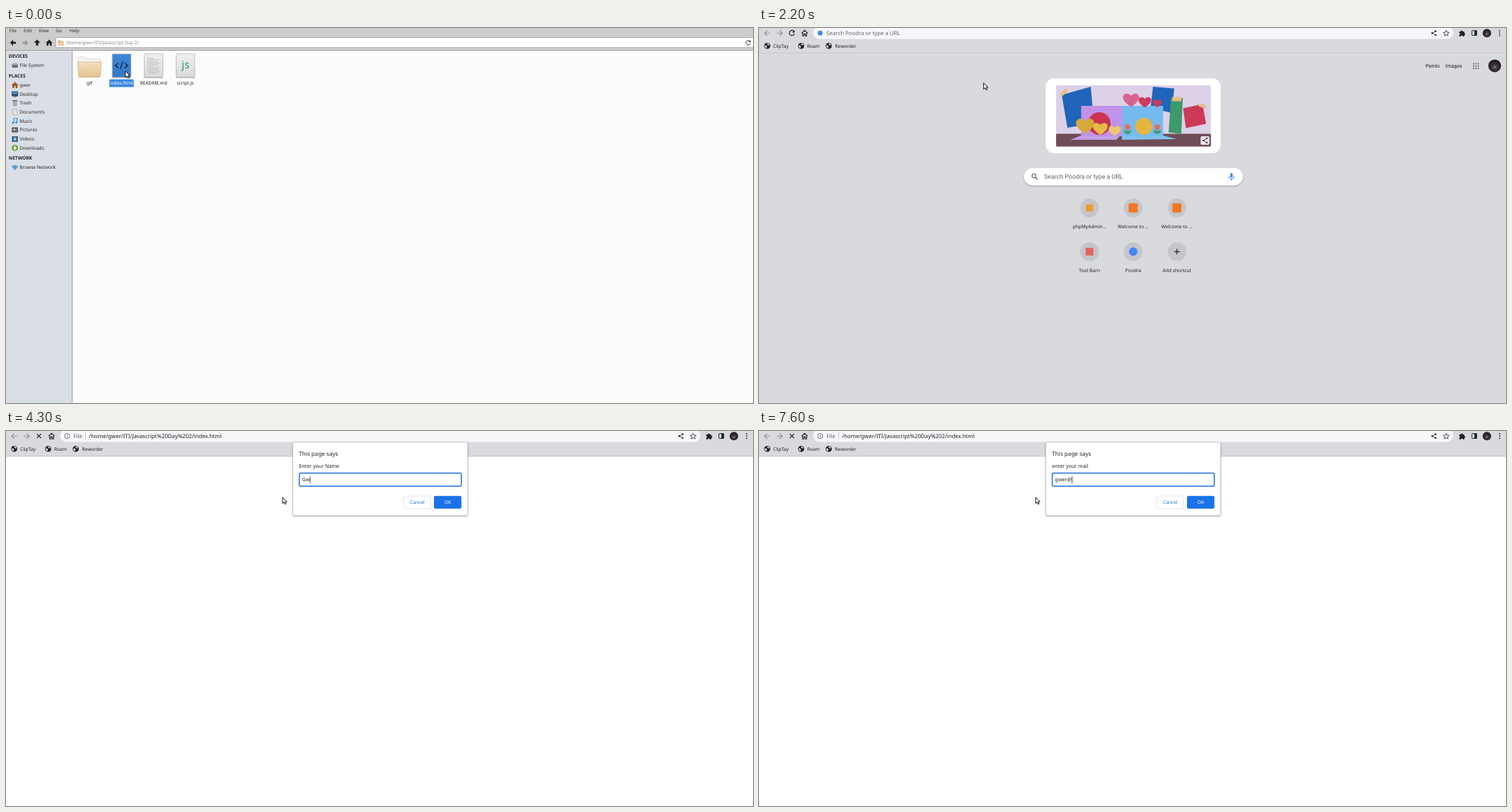
Recreate the animation shown at these times as an HTML page. Size 1056 by 530 pixels, loop 8000 ms.

```html
<!DOCTYPE html>
<html lang="en">
<head>
<meta charset="utf-8">
<title>Prompt demo</title>
<style>
html, body { margin: 0; width: 100%; height: 100%; overflow: hidden; background: #fff; }
svg { display: block; width: 100%; height: 100%; }
text { font-family: "Noto Sans", sans-serif; text-rendering: geometricPrecision; white-space: pre; }
.rb { font-family: Roboto, sans-serif; }
</style>
</head>
<body>
<svg id="stage" viewBox="0 0 1056 530" xmlns="http://www.w3.org/2000/svg"></svg>
<script>
const LOOP = 8000;
const USER = 'gwer', BRAND = 'Poodra';
const INK = '#202124', GREY = '#5f6368', BLUE = '#1a73e8', CHROME = '#d9dade';

// Markup helpers
const rect = (x, y, w, h, fill, r = 0, more = '') =>
  `<rect x="${x}" y="${y}" width="${w}" height="${h}" rx="${r}" fill="${fill}" ${more}/>`;
const circle = (x, y, r, fill, more = '') => `<circle cx="${x}" cy="${y}" r="${r}" fill="${fill}" ${more}/>`;
const path = (d, fill, more = '') => `<path d="${d}" fill="${fill}" ${more}/>`;
const line = (d, color, w = 1, more = '') => path(d, 'none', `stroke="${color}" stroke-width="${w}" ${more}`);
const text = (x, y, s, size = 6.6, fill = INK, more = '') =>
  `<text x="${x}" y="${y}" font-size="${size}" fill="${fill}" ${more}>${s}</text>`;
const place = (x, y, s = 1) => `matrix(${s} 0 0 ${s} ${x} ${y})`;
const move = (x, y, body, s = 1) => `<g transform="${place(x, y, s)}">${body}</g>`;
const group = (id, body) => `<g id="${id}">${body}</g>`;
const MID = 'text-anchor="middle"', BOLD = 'font-weight="bold"';

const defs = `<defs>
  <linearGradient id="tan" x2="0" y2="1"><stop stop-color="#f4dfbd"/><stop offset="1" stop-color="#e3c28f"/></linearGradient>
  <linearGradient id="paper" x2="0" y2="1"><stop stop-color="#f0f0f0"/><stop offset="1" stop-color="#d9d9d9"/></linearGradient>
  <linearGradient id="sel" x2="0" y2="1"><stop stop-color="#3c87da"/><stop offset="1" stop-color="#3478c6"/></linearGradient>
  <radialGradient id="photo" cy=".6"><stop stop-color="#8d8290"/><stop offset=".35" stop-color="#403641"/><stop offset="1" stop-color="#211a22"/></radialGradient>
  <filter id="shade" x="-10%" y="-20%" width="120%" height="150%"><feDropShadow dx="0" dy="1" stdDeviation="1.2" flood-opacity=".35"/></filter>
</defs>`;

// File manager
const house = (c, door) => path('M0 -4.5L4.8 0H3.5V4H-3.5V0H-4.8Z', c) + rect(-1, 1, 2, 3, door);
const places = [
  [53, 'File System', rect(-4, -2, 8, 5, '#666', 1) + rect(-3, -3.5, 6, 3, '#aaa', .5)],
  [81, USER, house('#8a5a30', '#f0dcc0') + line('M-4.5 0L0 -4L4.5 0', '#c0642c', 1.2)],
  [93.5, 'Desktop', rect(-4.5, -4, 9, 7, '#34485c', .5) + rect(-3.5, -3, 7, 3, '#4c90cc') + rect(-2, 3, 4, 1, '#555')],
  [106, 'Trash', path('M-3 -3H3L2.5 4.2H-2.5Z', '#9a9a9a') + rect(-3.6, -4, 7.2, 1.2, '#666') + line('M-1 -2V3M1 -2V3', '#ddd', .6)],
  [119, 'Documents', rect(-3, -4, 6, 8, '#f4f4f4', .5, 'stroke="#888" stroke-width=".6"') + line('M-2 -2H2M-2 0H2M-2 2H1', '#aaa', .5)],
  [131.5, 'Music', line('M-1.5 2.5V-3.5L3 -4V1.5', '#3a8fd0', 1.1) + circle(-2.6, 2.6, 1.5, '#3a8fd0') + circle(1.9, 1.8, 1.5, '#3a8fd0')],
  [144, 'Pictures', rect(-4.2, -3.4, 8.4, 6.8, '#444', .5) + rect(-3, -2.2, 6, 4.4, '#8b8074') + circle(-1, -.5, 1, '#eee')],
  [157, 'Videos', rect(-4, -4, 8, 8, '#3b4654', .5) + rect(-2.4, -3.3, 4.8, 6.6, '#4a94d8') + path('M-1 -1.6L1.8 0L-1 1.6Z', '#fff')],
  [169.5, 'Downloads', circle(0, 0, 4.4, '#6aa62c') + path('M-1 -2.8H1V0H2.6L0 2.9L-2.6 0H-1Z', '#fff')],
  [197, 'Browse Network', path('M-4.6 -1.2Q0 -5 4.6 -1.2L0 4Z', '#3a87c8') + line('M-3.4 .2Q0 -2.4 3.4 .2M-2 1.8Q0 .4 2 1.8', '#dadee6', .6)]
];
const sheet = (x, fill) => rect(x, 36.8, 26.4, 33, fill, .8, 'stroke="#a9a9a9" stroke-width=".7"') + line(`M${x} 70.3h26.4`, '#999', .6);
const navArrow = (x, c, s) => path(`M${x - 4 * s} 20.8l${4.2 * s} -4.4v3h${4 * s}v2.8h${-4 * s}v3z`, c);

const files = group('files',
  rect(0, 0, 1056, 530, '#fcfcfc') + rect(0, 0, 1056, 31.5, '#cccccc') +
  [['File', 4.5], ['Edit', 25], ['View', 46], ['Go', 70.3], ['Help', 89.5]].map(([s, x]) => text(x, 6, s, 6.6, '#333')).join('') +
  navArrow(9.8, '#222', 1) + navArrow(27.3, '#999', -1) +
  path('M44 16.2l4.5 4.6h-2.9v4h-3.2v-4h-2.9z', '#222') + move(61, 21, house('#222', '#ccc')) +
  rect(70.5, 13.5, 1000, 14.2, '#fff', 1.5, 'stroke="#9c9c9c" stroke-width=".8"') +
  path('M73 17.5h3.5l1 1h4v6.5h-8.5z', '#d5b07c') + rect(73, 19.5, 8.5, 5.2, '#ecd0a2') +
  `<text id="path" x="85" y="23.2" font-size="6.58">/home/${USER}/ITI/Javascript Day 2/</text>` +
  line('M1051.6 18.6a3.2 3.2 0 1 0 .7 3', '#333', 1) + path('M1052.6 16.8v3.2h-3.2z', '#333') +
  rect(0, 31, 1056, 1, '#a0a0a0') + rect(0, 32, 93.3, 498, '#dadee6') + rect(93.2, 32, .9, 498, '#8d9096') +
  [['DEVICES', 42], ['PLACES', 69.6], ['NETWORK', 186]].map(([s, y]) => text(3.8, y, s, 6.6, '#222', BOLD)).join('') +
  places.map(([y, s, icon]) => move(12.6, y, icon) + text(19.3, y + 2.4, s, 6.6, '#2a2a2a')).join('') +
  path('M102.5 50V43q0-2 2-2h8l2 2.5h17q2 0 2 2V50z', '#f4f4f2', 'stroke="#c8c8c4" stroke-width=".6"') +
  path('M101.5 48h33l-1 19.5q0 2-2 2h-27q-2 0-2-2z', 'url(#tan)', 'stroke="#c4a06c" stroke-width=".6"') +
  sheet(150.2, 'url(#sel)') + line('M159 49.5l-4.6 3.4 4.6 3.4M167.6 49.5l4.6 3.4-4.6 3.4M164.8 47.5l-3 10.5', '#14304e', 1.5) +
  sheet(195.4, 'url(#paper)') +
  Array.from({ length: 10 }, (_, i) => line(`M199.5 ${42.5 + i * 2.3}h${[9, 17, 15, 18, 16][i % 5]}`, '#b4b4b4', .8)).join('') +
  sheet(240.5, 'url(#paper)') + text(253.8, 57, 'js', 15, '#2c9484', MID) +
  rect(146, 72.4, 34.6, 11.2, '#3a88e0', 1.5) +
  [['gif', 118], ['index.html', 163.3, '#fff'], ['README.md', 208.6], ['script.js', 253.4]]
    .map(([s, x, c = '#222']) => text(x, 80.3, s, 6.6, c, MID)).join(''));

// Browser frame
const globe = x => circle(x, 25.2, 4.3, INK) +
  path(`M${x - 3.6} 24.4q3-.2 3.2 1.4t-1 3q-2.2-1.4-2.2-4.4zM${x} 21.6q2.6 .2 3.2 2.6-2 .6-3-.4z`, CHROME);
const arrow = (x, s) => line(`M${x + 4 * s} 7.2H${x - 4 * s}m${3.8 * s} -3.8l${-3.8 * s} 3.8l${3.8 * s} 3.8`, '#8f9297', 1.1);
const reload = line('M49.3 4.6a3.6 3.6 0 1 0 .8 3.4', INK, 1.2) + path('M50.4 2.9v3.6h-3.6z', INK);

const frame = group('frame',
  rect(0, 0, 1056, 36, CHROME) + rect(0, 35.5, 1056, .9, '#b4b6bb') +
  arrow(11.8, 1) + arrow(29, -1) +
  line('M60.3 7.2L64.5 3.3l4.2 3.9M61.7 6.6v4.7h1.8V8.4h2v2.9h1.8V6.6', INK, 1.1) +
  rect(76.5, -2.5, 905, 18, '#f6f7f9', 9) +
  [['ClipTay', 20, 11.6], ['Roam', 68, 59.6], ['Reworder', 107.5, 98.6]].map(([s, x, g]) => globe(g) + text(x, 27.5, s)).join('') +
  line('M956.5 4.7L951.8 7.2l4.7 2.5', INK, .8) + [[956.5, 4.5], [951.7, 7.2], [956.5, 9.9]].map(([x, y]) => circle(x, y, 1.2, INK)).join('') +
  path('M971.5 3.2l1.2 2.8 3 .3-2.3 2 .7 2.9-2.6-1.6-2.6 1.6 .7-2.9-2.3-2 3-.3z', 'none', `stroke="${INK}" stroke-width=".8"`) +
  path('M989.8 5h2.3a1.4 1.4 0 1 1 2.8 0h2.2v2.3a1.3 1.3 0 1 1 0 2.6v1.8h-2.3a1.2 1.2 0 1 0-2.4 0h-2.6V9.4a1.2 1.2 0 1 0 0-2.4z', INK) +
  rect(1007.8, 3.7, 6.8, 6.8, 'none', .6, `stroke="${INK}"`) + rect(1011.4, 3.5, 3.4, 7.2, INK) +
  circle(1029, 7.2, 6, 'url(#photo)') + [4, 7.2, 10.4].map(y => circle(1047, y, .9, INK)).join(''));

// New tab page
const heart = (x, y, s, c) => move(x, y, path('M0 .9C-2 -.3 -.6 -1.3 0 -.5C.6 -1.3 2 -.3 0 .9Z', c), s);
const flower = x => path(`M${x} 150v-8m0 7q-5 0-4.5-4q4 0 4.5 4q.5-4 4.5-4q.5 4-4.5 4`, '#3f9a68', 'stroke="#3f9a68"') + circle(x, 140, 4, '#e0705c');
const scene = rect(405.3, 71, 247.3, 106, '#fff', 12) +
  rect(420, 81, 218.8, 86.5, '#dcd1e8', 2) + rect(420, 149.5, 218.8, 18, '#6f4d57', 1) +
  path('M428 94.5L469 83l4.5 51.5-37.5 6.5z', '#2065ba') + path('M557 83l30 2.5-3.5 34.5-30-7z', '#2065ba') +
  path('M582.5 99h16.5l-2 50.5-18-2z', '#3c9a6c') + path('M599.5 113.5L627 107.5l5 28-28.5 6z', '#cc3a58') +
  path('M425 93l9-8 3 4-9 8z', '#e5bd86') + rect(584, 97.5, 13, 6, '#e5bd86') + path('M620 107l10 1 3 6-11-3z', '#e5bd86') +
  path('M440 158l20-8h53l-8 8z', '#c4a0e4') + path('M513 150h50l28 7-78 1z', '#80c0ee') +
  rect(455.5, 110, 58, 43, '#c192e8') + rect(513.3, 110, 58, 43, '#74baee') +
  circle(481, 135, 16, '#c93450') + circle(544, 139, 12, '#e3b63e') + flower(521) + flower(563) +
  heart(526, 101.5, 11, '#d8638e') + heart(545.5, 104.5, 8.5, '#cc3a5c') + heart(563, 106.5, 6.2, '#cc3a5c') +
  heart(461, 138, 12.5, '#d8a93a') + heart(482.5, 142, 10, '#e5bd45') + heart(503, 145, 8.3, '#ecc970') +
  rect(624.3, 153, 12.4, 12, '#ece6f0', 2) + line('M633 156l-5 3 5 3', '#444', .8) +
  [[633, 156], [628, 159], [633, 162]].map(([x, y]) => circle(x, y, 1.3, '#444')).join('');
const tiles = [
  ['phpMyAdmin…', rect(-5, -5, 10, 10, '#f29a2e')], ['Welcome to …', rect(-6.5, -6.5, 13, 13, '#f37623', 2)],
  ['Welcome to …', rect(-6.5, -6.5, 13, 13, '#f37623', 2)], ['Tool Barn', rect(-5.5, -5.5, 11, 11, '#e2665c')],
  [BRAND, circle(0, 0, 6, '#4285f4')], ['Add shortcut', line('M-4 0H4M0 -4V4', INK, 1.1)]
];
const newTab = group('newTab',
  rect(0, 36.4, 1056, 494, CHROME) + circle(86.5, 7.2, 3.4, '#4285f4') + reload +
  text(95.3, 10, `Search ${BRAND} or type a URL`, 7.8, GREY) +
  text(962.5, 56, 'Pemlo', 7.15, INK, 'class="rb" text-anchor="end"') + text(970.3, 56, 'Images', 7.15, INK, 'class="rb"') +
  [0, 1, 2, 3, 4, 5, 6, 7, 8].map(i => circle(1010.1 + i % 3 * 3.3, 50.5 + (i / 3 | 0) * 3.3, 1, GREY)).join('') +
  circle(1040, 53.4, 9, 'url(#photo)') + scene +
  rect(374.6, 198, 309.5, 24.4, '#fff', 12.2, 'filter="url(#shade)"') +
  circle(388.7, 209, 2.7, 'none', `stroke="${GREY}" stroke-width="1.1"`) + line('M390.6 211l3.4 3.4', GREY, 1.3) +
  text(403, 213.3, `Search ${BRAND} or type a URL`, 8.8, GREY, 'class="rb"') +
  rect(666.2, 205, 3.4, 6.6, '#4285f4', 1.7) + line('M664.2 209.6a3.7 3.7 0 0 0 7.4 0M667.9 213.3v2.4', '#4285f4', 1.1) +
  tiles.map(([s, icon], i) => {
    const x = 467.2 + i % 3 * 61.8, y = 254.3 + (i / 3 | 0) * 61.8;
    return circle(x, y, 13.2, '#c4c6ca') + move(x, y, icon) + text(x, y + 28.6, s, 6.7, INK, MID);
  }).join(''));

// Local page with its prompt
const page = group('page',
  rect(0, 36.4, 1056, 494, '#fff') + line('M43.6 4.2l6 6m0-6l-6 6', INK, 1.2) +
  circle(86.5, 7.2, 3.6, 'none', `stroke="${GREY}" stroke-width=".9"`) + line('M86.5 6.6v2.6M86.5 4.9v.9', GREY, .9) +
  text(95.4, 10, 'File', 7.8, GREY) + rect(112, 2, .8, 10, '#bcbfc4') +
  text(117.3, 10, `/home/${USER}/ITI/Javascript%20Day%202/index.html`, 7.8));
const dialog = group('dialog',
  rect(405.4, 15.8, 247.2, 103.4, '#fff', 2.2, 'stroke="#b5b7ba" stroke-width=".7" filter="url(#shade)"') +
  text(414.3, 34.9, 'This page says', 8.1) + `<text id="ask" x="414.3" y="51.8" font-size="7.1" fill="${INK}"/>` +
  rect(414.6, 59.5, 229, 18.6, '#fff', 1.6, 'stroke="#1f6fd6" stroke-width="1.5"') +
  `<text id="value" x="418.6" y="71.2" font-size="7.1" fill="${INK}"/>` + rect(0, 64.2, .8, 9.6, '#222', 0, 'id="caret"') +
  rect(562, 92, 38.5, 17.6, '#fff', 2, 'stroke="#dadce0" stroke-width=".7"') + text(581.4, 103.2, 'Cancel', 6.7, BLUE, MID) +
  rect(605, 91.8, 38.8, 18, BLUE, 2) + text(624.5, 103.2, 'OK', 6.7, '#fff', MID) +
  group('ghost', text(414.3, 50.8, 'Enter your Name', 7.1, INK, 'opacity=".08"') + text(418.6, 69.7, 'Gwer', 7.1, INK, 'opacity=".16"')));

const cursor = group('cursor',
  group('arrow', path('M.6 .6V9.4L2.7 7.6L4 10.6L5.5 9.9L4.2 7H6.8Z', '#fff', 'stroke="#111" stroke-width="1" stroke-linejoin="round"')) +
  group('hand', path('M.8 .8L4 3.2H6.5Q8.2 4 8 7.5Q7.6 10 4.8 10Q2 10 1.8 7L.9 5.4L2.6 4.8Z', '#fff', 'stroke="#222" stroke-width=".9" stroke-linejoin="round"') +
    line('M3.2 5.5h3.4M3.4 7.2h3', '#333', .6)));

document.getElementById('stage').innerHTML = defs + files + frame + newTab + page + dialog + cursor;
const el = Object.fromEntries([...document.querySelectorAll('svg [id]')].map(n => [n.id, n]));

// Timed states: each entry holds from its time until the next
const states = {
  view: [[0, 'files'], [2200, 'newTab'], [2300, 'page']],
  path: [[0, '#88847c'], [200, '#55544f'], [300, '#2e2e2e']],
  pointer: [[0, 168.3, 60.4], [700, 196, 70], [800, 246, 79], [900, 288.5, 76], [1100, 420, 76.5], [1300, 388, 76.5],
    [1400, 290, 77], [1500, 194, 77], [1600, 254, 77], [1700, 317, 77], [2700, 346, 83.5], [2900, 390.5, 93]],
  hand: [[0, false], [2000, true], [2200, false]],
  // opacity, rise, scale
  pop: [[0, 0, 0, 1], [2300, .02, 7.5, 1.018], [2400, .6, 5.5, 1.012], [2500, 1, 0, 1], [5300, .86, 4.6, 1.009], [5500, 1, 0, 1]],
  ask: [[0, 'Enter your Name'], [5300, 'enter your mail']],
  typed: [[0, ''], [4000, 'G'], [4300, 'Gw'], [4500, 'Gwe'], [4800, 'Gwer'], [5300, ''],
    [6600, 'g'], [6700, 'gw'], [6800, 'gwe'], [6900, 'gwer'], [7600, 'gwer@']],
  caret: [[0, true], [2700, false], [3200, true], [3700, false], [4000, true], [5800, false], [6200, true], [7500, false], [7600, true]]
};
const at = (name, t) => states[name].findLast(s => s[0] <= t).slice(1);
const show = (node, on) => node.setAttribute('display', on ? 'inline' : 'none');

function draw(t) {
  const [view] = at('view', t), [x, y] = at('pointer', t), [hand] = at('hand', t);
  const [alpha, rise, scale] = at('pop', t);
  show(el.files, view === 'files');
  show(el.frame, view !== 'files');
  show(el.newTab, view === 'newTab');
  show(el.page, view === 'page');
  el.path.setAttribute('fill', at('path', t)[0]);

  show(el.dialog, alpha > 0);
  el.dialog.setAttribute('opacity', alpha);
  el.dialog.setAttribute('transform', place(529 * (1 - scale), 67.5 * (1 - scale) - rise, scale));
  el.ask.textContent = at('ask', t)[0];
  el.value.textContent = at('typed', t)[0];
  show(el.ghost, t >= 5300 && t < 5500);
  show(el.caret, at('caret', t)[0]);
  if (alpha > 0) el.caret.setAttribute('x', 418.8 + (el.value.textContent ? el.value.getComputedTextLength() : 0));

  el.cursor.setAttribute('transform', place(x, y));
  show(el.hand, hand);
  show(el.arrow, !hand);
}

const start = performance.now();
function tick() {
  draw((performance.now() - start) % LOOP);
  requestAnimationFrame(tick);
}
tick();
</script>
</body>
</html>
```
